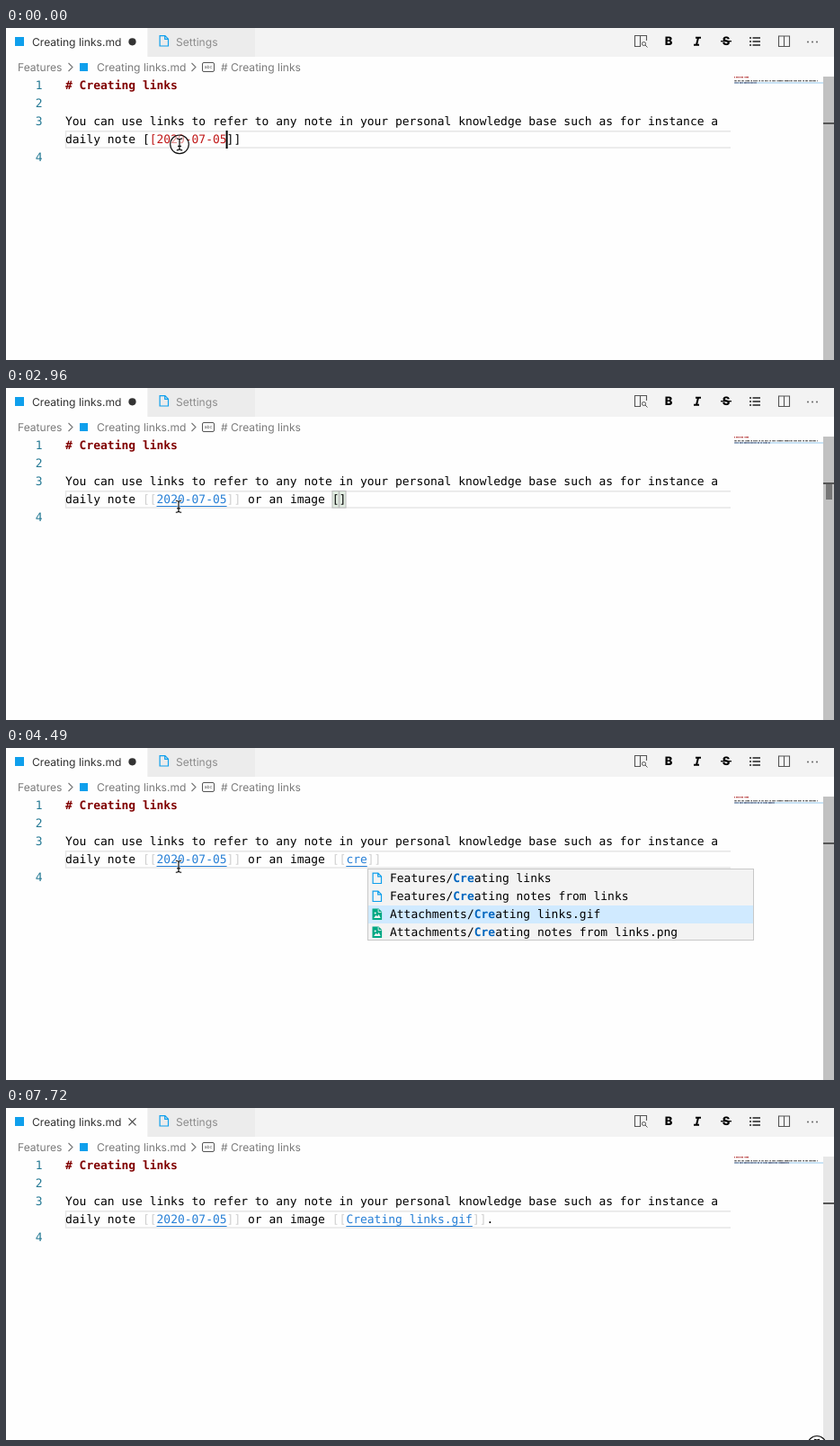
An HTML page that plays this animation: 921 px wide and 369 px high, repeating every 7850 ms.

```html
<!DOCTYPE html>
<html lang="en">
<head>
<meta charset="utf-8">
<title>Creating links</title>
<style>
  html, body { margin: 0; width: 100%; height: 100%; overflow: hidden; background: #fefefe; }
  svg { display: block; width: 921px; height: 369px; }
  text { white-space: pre; text-rendering: geometricPrecision; }
  .code text { font: 12.97px "DejaVu Sans Mono", monospace; }
  .ui text { font: 12.08px Inter, sans-serif; }
  .code .num { fill: #237893; text-anchor: end; }
  .code .head { fill: #800000; font-weight: bold; }
  .hit { fill: #0066bf; font-weight: bold; }
  .red { fill: #c01818; }
  .dim { fill: #cfcfcf; }
  .link { fill: #267fd6; }
  .crumb { fill: #7b7b7b; }
  .ui .tool { font-weight: 800; font-size: 13px; text-anchor: middle; }
  .line { fill: none; stroke: #555; }
</style>
</head>
<body>
<svg viewBox="0 0 921 369" xmlns="http://www.w3.org/2000/svg">
  <defs>
    <g id="doc" fill="none" stroke="#0f9fec" stroke-width="1.2">
      <path d="M.6 .6H6.4L10 4.2V12H.6ZM6.2 .8V4.4H9.8"/>
    </g>
    <g id="pic">
      <path d="M0 0H7L10.6 3.6V12.6H0Z" fill="#00a884"/>
      <path d="M6.6 .6V4H10" fill="none" stroke="#f3f3f3" stroke-width=".9"/>
      <path d="M1.6 10.6L4 7.2L5.6 8.8L7.2 6.6L9.2 10.6Z" fill="#f3f3f3"/>
      <circle cx="3.2" cy="5" r="1.1" fill="#f3f3f3"/>
    </g>
    <path id="beam" d="M-3.2-6.5Q-.6-6.5 0-5.2Q.6-6.5 3.2-6.5M0-5.4V5.4M-3.2 6.5Q-.6 6.5 0 5.2Q.6 6.5 3.2 6.5M-2 2H2" fill="none"/>
  </defs>

  <rect width="921" height="369" fill="#fefefe"/>
  <g class="ui">
    <rect width="921" height="32" fill="#f3f3f3"/>
    <rect width="157" height="33" fill="#fefefe"/>
    <rect x="158" width="119" height="32" fill="#ececec"/>
    <rect x="10" y="10" width="10" height="10" fill="#0f9fec"/>
    <text x="29" y="19.5" fill="#333">Creating links.md</text>
    <circle id="dirty" cx="140.5" cy="15.3" r="4.1" fill="#333"/>
    <path id="close" d="M136.5 11.3L144.5 19.3M144.5 11.3L136.5 19.3" stroke="#444" stroke-width="1.2"/>
    <use href="#doc" x="170.5" y="8"/>
    <text x="189" y="19.5" fill="#8b8b8b">Settings</text>

    <text class="crumb" x="13" y="47.7">Features</text>
    <path d="M69.5 39L74 43.5L69.5 48M206.5 39L211 43.5L206.5 48" fill="none" stroke="#777" stroke-width="1.1"/>
    <rect x="82" y="39" width="9" height="9" fill="#0f9fec"/>
    <text class="crumb" x="101" y="47.7">Creating links.md</text>
    <rect class="line" x="218.5" y="38.5" width="13" height="10" rx="1.5"/>
    <text x="220.7" y="45.3" fill="#555" style="font-size:5px">abc</text>
    <text class="crumb" x="239" y="47.7"># Creating links</text>

    <path class="line" d="M706 20.5H699.5V8.5H712.5V14M705.5 8.5V20.5" stroke-width="1.1"/>
    <circle class="line" cx="709.5" cy="17.5" r="2"/>
    <path class="line" d="M711 19L713.5 21.5"/>
    <text class="tool" x="737" y="19.3">B</text>
    <path d="M767 10.8H773M765 18.7H771M770 10.8L768 18.7" fill="none" stroke="#000" stroke-width="2"/>
    <text class="tool" x="801" y="19.3">S</text>
    <path d="M795 14.7H807" stroke="#000" stroke-width="1.3"/>
    <path d="M827 11H829M827 15H829M827 19H829M830.5 11H839M830.5 15H839M830.5 19H839" stroke="#222" stroke-width="1.6"/>
    <path class="line" d="M859.5 9H871.5V20.5H859.5ZM865.5 9V20.5" stroke-width="1.1"/>
    <g fill="#555"><circle cx="892" cy="15.5" r=".9"/><circle cx="897" cy="15.5" r=".9"/><circle cx="902" cy="15.5" r=".9"/></g>
  </g>

  <g id="minimap"></g>
  <rect id="slider" x="909" y="54" width="12" height="315" fill="#646464"/>
  <rect id="mark" x="912" y="106" width="7" height="18" fill="#777"/>
  <rect x="909" y="105" width="12" height="2" fill="#555"/>

  <g class="code">
    <path d="M66 114.7H806M66 133H806M66.5 114V133.5" stroke="#e6e6e6" stroke-width="1.4"/>
    <text class="num" x="40.5" y="68">1</text>
    <text class="num" x="40.5" y="88">2</text>
    <text class="num" x="40.5" y="108">3</text>
    <text class="num" x="40.5" y="148">4</text>
    <text class="head" x="66" y="68"># Creating links</text>
    <text id="para" x="66" y="108"></text>
    <g id="row"></g>
    <g id="popup"></g>
  </g>
  <g id="mouse">
    <circle id="press" r="10.3" fill="#fff" fill-opacity=".5" stroke="#111" stroke-width="1.2"/>
    <use href="#beam" stroke="#fff" stroke-width="2.4" stroke-opacity=".7"/>
    <use href="#beam" stroke="#000" stroke-width="1.15"/>
  </g>
</svg>
<script>
const LOOP = 7850, PITCH = 7.808, LEFT = 66;
const el = id => document.getElementById(id);
const col = n => LEFT + n * PITCH;
const within = (t, a, b) => t >= a && t < b;
const show = (id, on) => el(id).setAttribute('visibility', on ? 'visible' : 'hidden');
// Value of the last [time, value] pair already reached.
const at = (t, keys) => keys.reduce((v, k) => t >= k[0] ? k[1] : v, keys[0][1]);
const rect = (x, y, w, h, fill, extra = '') =>
  `<rect x="${x}" y="${y}" width="${w}" height="${h}" fill="${fill}" ${extra}/>`;
const span = (cls, s) => `<tspan class="${cls}">${s}</tspan>`;
const underline = (from, n) => rect(col(from), 131, n * PITCH, 1, '#267fd6');

const PARA = 'You can use links to refer to any note in your personal knowledge base such as for instance a';
const DATE = '2020-07-05', PHRASE = ' or an image ', NAME = 'Creating links.gif';
const TYPED = [590, 760, 860, 950, 1050, 1220, 1400, 1540, 1720, 1960, 1960, 2020, 2130];
const BLINKS = [[2960, 3260], [4310, 4850], [6900, 7410], [7720, LOOP]];
const MATCHES = [[2550, 3260, 38, 39], [5080, 5820, 39, 58], [5820, 6340, 38, 59]];

const MAKING = ['Features/Creating links', 'Features/Creating notes from links',
  'Attachments/Creating links.gif', 'Attachments/Creating notes from links.png'];
const SOME = ['Features/Commands', ...MAKING, 'Attachments/Open link command.png'];
const ALL = ['2020-07-04', DATE, 'Features/Backlinks', 'Features/Commands', MAKING[0], MAKING[1],
  'Features/Daily notes', 'Features/Embedding files', 'Features/Opening links',
  MAKING[2], MAKING[3], SOME[5]];

el('para').textContent = PARA;

function drawRow(t) {
  const tail = PHRASE.slice(0, TYPED.filter(k => t >= k).length);
  const query = at(t, [[0, ''], [3590, 'c'], [3770, 'cr'], [3830, 'cre'], [5030, NAME]]);
  let line = 'daily note ';
  line += t < 240 ? '[' + span('red', '[' + DATE) + ']]'
                  : span('dim', '[[') + span('link', DATE) + span('dim', ']]');
  line += tail;
  if (t >= 3830) line += span('dim', '[[') + span('link', query) + span('dim', ']]');
  else if (t >= 3260) line += '[' + span('red', '[' + query) + ']]';
  else if (t >= 2490) line += '[]';
  if (t >= 6280) line += '.';

  let caret = at(t, [[0, 23], [150, 24], [410, 25]]) + tail.length;
  caret += at(t, [[0, 0], [2490, 1], [3260, 2]]) + query.length;
  caret += at(t, [[0, 0], [5530, 1], [5820, 2], [6280, 3]]);

  let out = '';
  const match = MATCHES.find(m => within(t, m[0], m[1]));
  if (match) for (const c of match.slice(2))
    out += rect(col(c) + .3, 114.5, 7.2, 18.5, '#e2ede2', 'stroke="#b9b9b9" stroke-width="1"');
  out += `<text x="${LEFT}" y="128">${line}</text>`;
  if (t >= 880) out += underline(13, DATE.length);
  if (within(t, 4250, 5030) || t >= 5990) out += underline(40, query.length);
  if (!BLINKS.some(b => within(t, b[0], b[1]))) out += rect(col(caret) - 1, 114, 2, 20, '#000');
  el('row').innerHTML = out;
  show('mark', match);

  drawMinimap(line.replace(/<[^>]*>/g, ''));
  drawPopup(t, query, caret);
}

function tinyLine(s, y, fill) {
  return [...s].map((c, i) => c === ' ' ? '' :
    rect(810 + i, y, 1, 1.4, fill, `opacity="${.4 + c.charCodeAt(0) % 4 * .1}"`)).join('');
}

let lastLine;
function drawMinimap(line) {
  if (line === lastLine) return;
  lastLine = line;
  el('minimap').innerHTML = rect(810, 60, 99, 2, '#c9e3f5') +
    tinyLine('# Creating links', 54, '#a00000') +
    tinyLine(PARA, 58, '#222') + tinyLine(line, 60.2, '#335');
}

function drawPopup(t, query, caret) {
  if (!within(t, 3260, 5030)) { el('popup').innerHTML = ''; return; }
  const items = t < 3590 ? ALL : t < 3770 ? SOME : MAKING;
  const pick = at(t, [[0, 0], [4310, 1], [4490, 2]]);
  const x = Math.floor(col(caret)), n = query.length;
  let out = rect(x + .5, 134.5, 429, items.length * 20 - 1, '#f3f3f3', 'stroke="#c8c8c8"');
  out += rect(x + 1, 135 + pick * 20, 428, 20, '#d0eaff');
  items.forEach((s, i) => {
    const y = 135 + i * 20, icon = /\.(gif|png)$/.test(s) ? 'pic' : 'doc';
    const k = s.toLowerCase().indexOf(query, s.indexOf('/') + 1);
    const label = n ? s.slice(0, k) + span('hit', s.slice(k, k + n)) + s.slice(k + n) : s;
    out += `<use href="#${icon}" x="${x + 5.5}" y="${y + 3.5}"/>` +
      `<text x="${x + 25}" y="${y + 14}">${label}</text>`;
  });
  el('popup').innerHTML = `<g transform="translate(1 0)">${out}</g>`;
}

function mouseAt(t) {
  if (within(t, 6700, 7580)) {
    const p = Math.min(1, (Math.floor((t - 6700) / 67) + 1) / 8), e = p * p * (3 - 2 * p);
    return [198 + 589 * e, 125 + 201 * e];
  }
  return at(t, [[0, [193, 129.3]], [60, [192, 131.7]], [5990, [195, 128]], [6050, [198, 125.5]],
    [7580, [830, 345]], [7650, [880, 365]], [7720, [902, 374.8]]]);
}

function draw(t) {
  drawRow(t);
  const [x, y] = mouseAt(t);
  el('mouse').setAttribute('transform', `translate(${x} ${y})`);
  el('press').setAttribute('opacity', at(t, [[0, 1], [60, .5], [150, 0], [7720, 1]]));
  show('dirty', t < 7650);
  show('close', t >= 7650);
  el('slider').setAttribute('opacity', at(t, [[0, .4], [7580, .32], [7650, .23], [7720, .15]]));
}

const start = performance.now();
function tick() {
  draw((performance.now() - start) % LOOP);
  requestAnimationFrame(tick);
}
tick();
</script>
</body>
</html>
```
